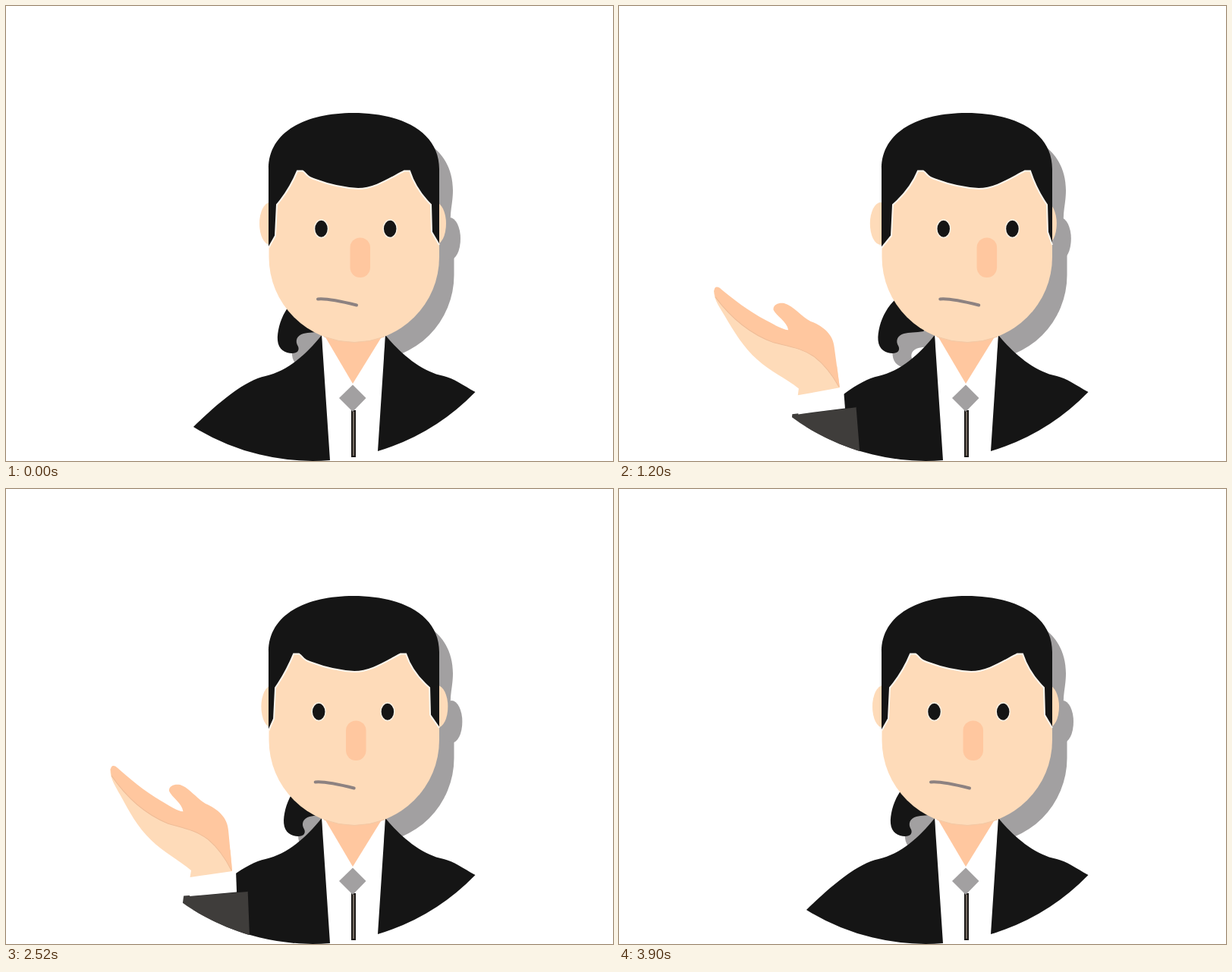
These frames come from a looping animation (800x600 px, 4500 ms). An HTML page:

```html
<!DOCTYPE html>
<html lang="en">
<head>
<meta charset="utf-8">
<title>Puzzled man</title>
<style>
html, body { margin: 0; width: 100%; height: 100%; overflow: hidden; background: #fff; }
svg { display: block; width: 100vw; height: 100vh; }
.ink { fill: #151515; }
.skin { fill: #fedbb9; }
.blush { fill: #ffc79f; }
.grey { fill: #a2a0a1; }
.white { fill: #fff; }
</style>
</head>
<body>
<svg viewBox="0 0 800 600">
  <defs>
    <clipPath id="disc"><circle cx="404" cy="302" r="298"/></clipPath>
    <path id="tail" d="M400 376C372 384 357 418 358 441C359 453 368 458 377 458C384 458 387 454 385 449C380 441 384 434 392 432C399 430 407 431 418 429L430 390Z"/>
    <g id="ears">
      <ellipse cx="348" cy="287" rx="14" ry="28"/>
      <ellipse cx="566" cy="287" rx="14" ry="28"/>
    </g>
  </defs>

  <g class="grey">
    <path d="M540 182H557C575 193 589 214 589 243C589 260 585 270 586 284L590.500 320V355A112 112 0 0 1 366.500 355V215Z"/>
    <g transform="translate(19 20)">
      <use class="ears" href="#ears"/>
      <use class="tail" href="#tail" y="-1"/>
    </g>
  </g>
  <use class="tail ink" href="#tail"/>

  <path class="white" d="M416 434H500L490 587L427 599Z"/>
  <path class="blush" d="M417 430H499L457 498Z"/>
  <path class="ink" d="M416 434C396 459 372 481 342 488C314 494 281 522 247 555A298 298 0 0 0 427 599Z"/>
  <path class="ink" d="M500 434C518 456 546 482 577 488C590 491 602 500 618.500 509A298 298 0 0 1 490 587Z"/>
  <path d="M458 533V595" stroke="#1d1a18" stroke-width="6"/>
  <path d="M458 535V593" stroke="#8b8076" stroke-width="1.600"/>
  <path class="grey" d="M457 499.500L474.500 517L457 535L439 517Z"/>

  <use class="ears skin" href="#ears"/>
  <path class="skin" d="M346.500 331V215H571V331A112.250 112.250 0 0 1 346.500 331Z"/>
  <path d="M419 436Q459 451 499 436" fill="none" stroke="#f3c9a5" stroke-width="1"/>
  <path id="hair" class="ink"/>
  <path id="hairline" fill="none" stroke="#fff7ee" stroke-width="2"/>
  <rect id="nose" class="blush" x="453.500" y="305.500" width="26.500" height="52.500" rx="13.200"/>
  <g id="face">
    <g id="eyes" class="ink" stroke="#fff3e6" stroke-width="1.500">
      <ellipse cx="415.500" cy="293.800" rx="9" ry="11.700"/>
      <ellipse cx="506.200" cy="293.800" rx="9" ry="11.700"/>
    </g>
    <path d="M411 386.500Q424 385 462 394.500" fill="none" stroke="#8d8281" stroke-width="4" stroke-linecap="round"/>
  </g>

  <g clip-path="url(#disc)">
    <g id="arm">
      <path d="M226 539L310 528L316 590L321 680H215Z" fill="#3f3d3b"/>
      <path d="M236 538L310 528" stroke="#151515" stroke-width="1.500"/>
      <path class="white" d="M232 513.500L240 506L285 498L293 503.500L295.500 530L234 539Z"/>
      <path class="skin" d="M120 377C120 390 129 401 135 411C148 432 160 452 179 468C196 483 217 492 234 505L233 514L288 503L284 475L240 440L160 405Z"/>
      <path class="blush" d="M120.500 379C120 372 125 371 130 376C145 388 166 404 190 416C202 422 212 428 219 428C217 417 203 410 199 402C198 395 206 392 213 393C225 396 237 411 248 416C264 422 278 432 280 450L288 503C280 490 270 475 254 463C238 452 222 450 200 445C168 434 142 412 122 386Z"/>
      <path d="M122 386C142 412 168 434 200 445C222 450 238 452 254 463C270 475 280 490 287 502" fill="none" stroke="#efbc97" stroke-width="1"/>
    </g>
  </g>
</svg>
<script>
const LOOP = 4500, STEP = 30, LOWERED = 118;
const $ = id => document.getElementById(id);
const each = (cls, fn) => document.querySelectorAll(cls).forEach(fn);

const smooth = u => u * u * (3 - 2 * u);
const inOut = n => u => u < .5 ? (2 * u) ** n / 2 : 1 - (2 - 2 * u) ** n / 2;
const ramp = (t, a, b, ease) => ease(Math.min(1, Math.max(0, (t - a) / (b - a))));

// Part offsets at the two ends of a head turn.
const RIGHT = { eye: 14.5, nose: 21.6, hair: 12.5, ear: -4.2, tail: -20.6 };
const LEFT = { eye: -8.9, nose: -14.7, hair: -13, ear: 6.4, tail: 22 };

function headPose(t) {
  const right = ramp(t, 30, 720, inOut(4)) - ramp(t, 1050, 1830, smooth);
  const left = ramp(t, 1050, 1830, smooth) - ramp(t, 2010, 2880, smooth);
  const pose = {};
  for (const k in RIGHT) pose[k] = RIGHT[k] * right + LEFT[k] * left;
  return pose;
}

function drawHair(d) {
  const s = d * .4;
  const line = `${357 + s} 262Q${374 + d} 242 ${384 + d} 217.500L${391 + d} 217.500` +
    `C${397 + d} 221 ${394 + d} 225 ${408 + d} 229C${424 + d} 235 ${446 + d} 240 ${464 + d} 241` +
    `C${486 + d} 241 ${506 + d} 227 ${525 + d} 217.500L${532 + d} 217.500Q${540 + d} 242 ${560 + s} 262`;
  const side = `M346 319L${355 + s} 303L`;
  const burn = `L${561 + s} 298L571 315`;
  $('hair').setAttribute('d', side + line + burn + 'V215C571 165 520 141 458 141S346 165 346 215Z');
  $('hairline').setAttribute('d', side + line + burn);
}

function drawArm(t) {
  const sweep = LOWERED * (1 - ramp(t, 30, 770, inOut(4)) + ramp(t, 3180, 3995, smooth));
  const wave = 13.5 * (ramp(t, 1080, 1830, smooth) - ramp(t, 2010, 2790, inOut(2)));
  const rad = Math.PI / 180;
  const x = (14 * sweep + 40 * wave) * rad;
  const y = (33 * sweep - 15 * wave) * rad;
  $('arm').setAttribute('transform', `translate(${x} ${y}) rotate(${sweep + wave} 258 643)`);
  $('arm').style.display = sweep > 86 ? 'none' : '';
}

function draw(ms) {
  const t = Math.floor((ms % LOOP) / STEP) * STEP;
  const p = headPose(t);
  const shift = (el, x) => el.setAttribute('transform', `translate(${x} 0)`);
  each('.ears', el => shift(el, p.ear));
  each('.tail', el => shift(el, p.tail));
  shift($('nose'), p.nose);
  shift($('face'), p.eye);
  drawHair(p.hair);
  const shut = t >= 3750 && t < 3900;
  $('eyes').setAttribute('transform', shut ? 'translate(0 293.8) scale(1 .12) translate(0 -293.8)' : '');
  drawArm(t);
}

const start = performance.now();
function tick() {
  draw(performance.now() - start);
  requestAnimationFrame(tick);
}
tick();
</script>
</body>
</html>
```
